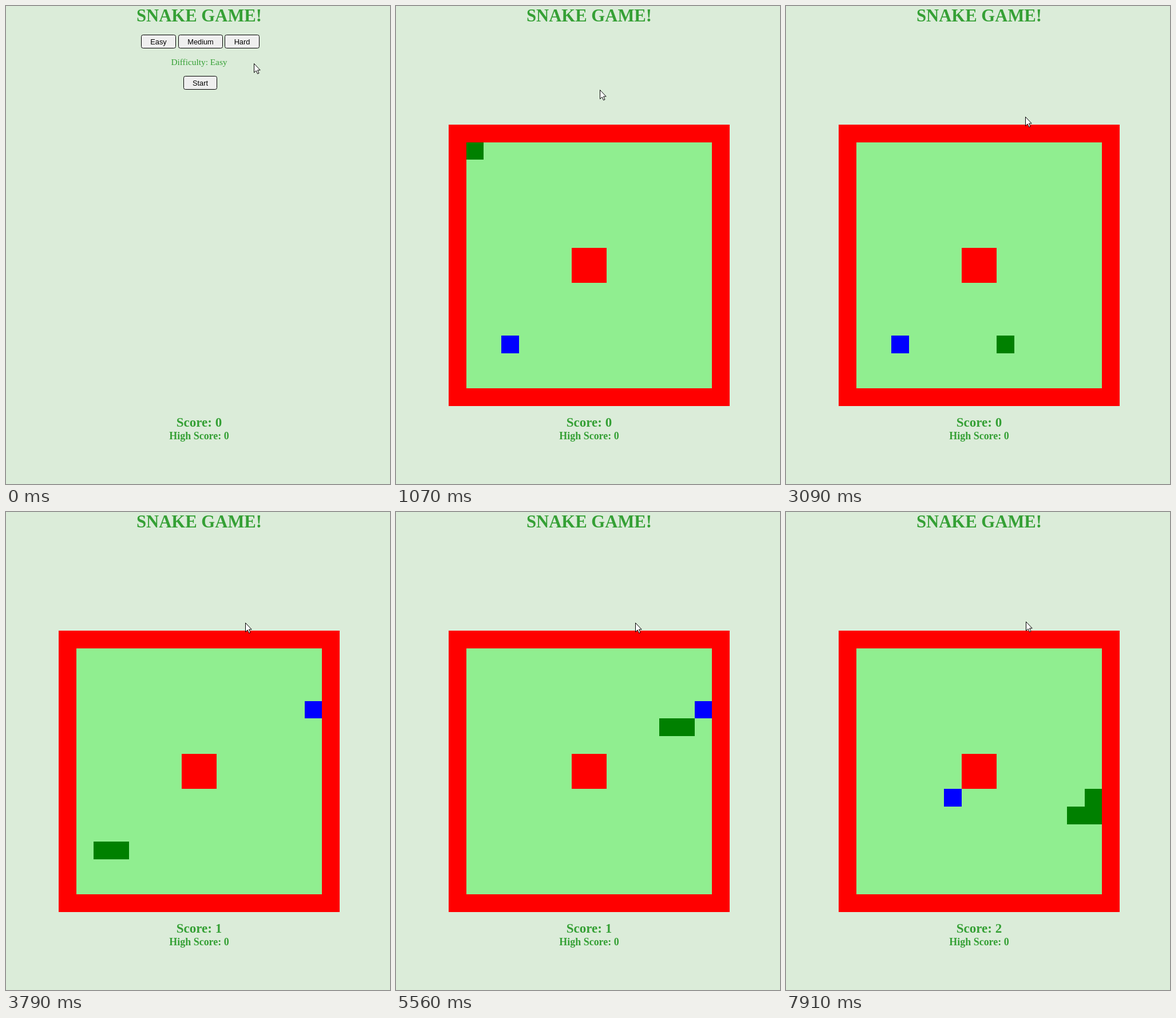
Recreate the animation shown at these times as an HTML page. Size 671x834 px, loop 7.99 s.

```html
<!DOCTYPE html>
<html lang="en">
<head>
<meta charset="utf-8">
<title>Snake game</title>
<style>
  html, body { margin: 0; width: 100%; height: 100%; overflow: hidden; background: #dbecd9; }
  svg { display: block; width: 100vw; height: 100vh; }
  text { text-anchor: middle; }
  .label { font-family: "Liberation Serif", "Times New Roman", serif; fill: #35a035; }
  .bold { font-weight: bold; }
  .button text { font: 12.8px "Liberation Sans", Arial, sans-serif; }
  .button rect { fill: #efefef; stroke: #000; }
</style>
</head>
<body>
<svg viewBox="0 0 671 834">
  <text class="label bold" x="337.5" y="27" font-size="30.69">SNAKE GAME!</text>
  <g id="menu">
    <text class="label" id="difficulty" x="337.5" y="103" font-size="15.34"></text>
  </g>
  <g id="board" shape-rendering="crispEdges"></g>
  <text class="label bold" id="score" x="337.5" y="733.5" font-size="23"></text>
  <text class="label bold" x="337.5" y="755.5" font-size="17.95">High Score: 0</text>
  <path id="cursor" d="M.5 .5V16.2L4.1 12.8L6.6 18.3L9 17.2L6.6 11.9H11.2Z" fill="#fff" stroke="#000"/>
</svg>
<script>
const LOOP = 7990;
const BOARD_SHOWN = 920;
const HARD_CHOSEN = 400;
const CELL = 30.69;
const $ = id => document.getElementById(id);

function add(parent, tag, attrs) {
  const node = document.createElementNS("http://www.w3.org/2000/svg", tag);
  for (const key in attrs) node.setAttribute(key, attrs[key]);
  return parent.appendChild(node);
}

const buttons = [
  ["Easy", 236, 50, 61], ["Medium", 301, 50, 78], ["Hard", 382, 50, 61], ["Start", 310, 122, 59]
].map(([label, x, y, w]) => {
  const group = add($("menu"), "g", { class: "button" });
  const face = add(group, "rect", { x: x + .5, y: y + .5, width: w - 1, height: 23, rx: 3 });
  add(group, "text", { x: x + w / 2, y: y + 16.5 }).textContent = label;
  return { face, x, y, w };
});

const gridX = col => Math.round(91.85 + col * CELL);
const gridY = row => Math.round(207 + row * CELL);

function block(fill, col, row, size = 1) {
  const node = add($("board"), "rect", { fill });
  place(node, [col, row], size);
  return node;
}

function place(node, [col, row], size = 1) {
  const x = gridX(col), y = gridY(row);
  node.setAttribute("x", x);
  node.setAttribute("y", y);
  node.setAttribute("width", gridX(col + size) - x);
  node.setAttribute("height", gridY(row + size) - y);
}

block("#f00", 0, 0, 16);
block("#90ee90", 1, 1, 14);
block("#f00", 7, 7, 2);
const foodNode = block("#00f", 3, 12);
const bodyNodes = [0, 1, 2].map(() => block("#008000", 1, 1));

// Each run: first time, last time, evenly spaced moves ("-" waits).
const runs = [
  [1160, 1700, "RRR-RRR-"], [1770, 2090, "RRRDD"], [2260, 2400, "DDD"],
  [2550, 2780, "DDDD"], [2950, 3090, "DDL"], [3250, 3480, "LLLL"],
  [3650, 3790, "LLL"], [3940, 4180, "UUUU"], [4330, 4550, "UUUR"],
  [4700, 4870, "RRR"], [5020, 5260, "RRRR"], [5400, 5560, "RRR"],
  [5720, 5960, "UUUL"], [6120, 6660, "LLL-LDRR"], [6830, 7060, "RRRR"],
  [7210, 7380, "DDD"], [7530, 7760, "DDDD"], [7910, 7910, "L"]
];
const steps = { R: [1, 0], L: [-1, 0], U: [0, -1], D: [0, 1] };
const foods = [[3, 12], [14, 4], [6, 9]];

function playGame() {
  const states = [{ at: 0, body: [[1, 1]], eaten: 0 }];
  for (const [from, to, moves] of runs) {
    [...moves].forEach((move, i) => {
      if (move === "-") return;
      const last = states[states.length - 1];
      const head = last.body[0].map((v, axis) => v + steps[move][axis]);
      const eaten = last.eaten + (String(head) === String(foods[last.eaten]) ? 1 : 0);
      const body = [head, ...last.body].slice(0, eaten + 1);
      const at = from + (to - from) * i / Math.max(1, moves.length - 1);
      states.push({ at: Math.floor(at / 10) * 10, body, eaten });
    });
  }
  return states;
}
const states = playGame();

const cursorPath = [
  [0, 433, 100], [70, 433, 100], [300, 424, 68], [480, 422, 66], [760, 347, 136],
  [920, 345, 137], [1070, 356, 146], [1160, 356, 146], [1700, 412, 183],
  [2090, 418, 186], [2260, 418, 187], [2400, 418, 193], [6349, 418, 193],
  [6350, 419, 191], [LOOP, 419, 191]
];

function cursorAt(t) {
  const i = cursorPath.findIndex(point => point[0] > t);
  const [t0, x0, y0] = cursorPath[i - 1], [t1, x1, y1] = cursorPath[i];
  const k = (t - t0) / (t1 - t0);
  return [Math.round(x0 + (x1 - x0) * k), Math.round(y0 + (y1 - y0) * k)];
}

function render(t) {
  const playing = t >= BOARD_SHOWN;
  $("menu").style.display = playing ? "none" : "";
  $("board").style.display = playing ? "" : "none";
  $("difficulty").textContent = "Difficulty: " + (t < HARD_CHOSEN ? "Easy" : "Hard");

  const [cx, cy] = cursorAt(t);
  $("cursor").setAttribute("transform", `translate(${cx} ${cy})`);
  for (const { face, x, y, w } of buttons) {
    const hover = cx >= x && cx < x + w && cy >= y && cy < y + 24;
    face.style.fill = hover ? "#e5e5e5" : "";
  }

  const index = states.findLastIndex(state => state.at <= t);
  const { body, eaten } = states[index];
  bodyNodes.forEach((node, i) => place(node, body[i] || body[0]));
  place(foodNode, foods[eaten]);
  // The score counts the food one move before it is reached.
  const ahead = states[Math.min(index + 1, states.length - 1)];
  $("score").textContent = "Score: " + ahead.eaten;
}

const start = performance.now();
function tick() {
  render((performance.now() - start) % LOOP);
  requestAnimationFrame(tick);
}
tick();
</script>
</body>
</html>
```
